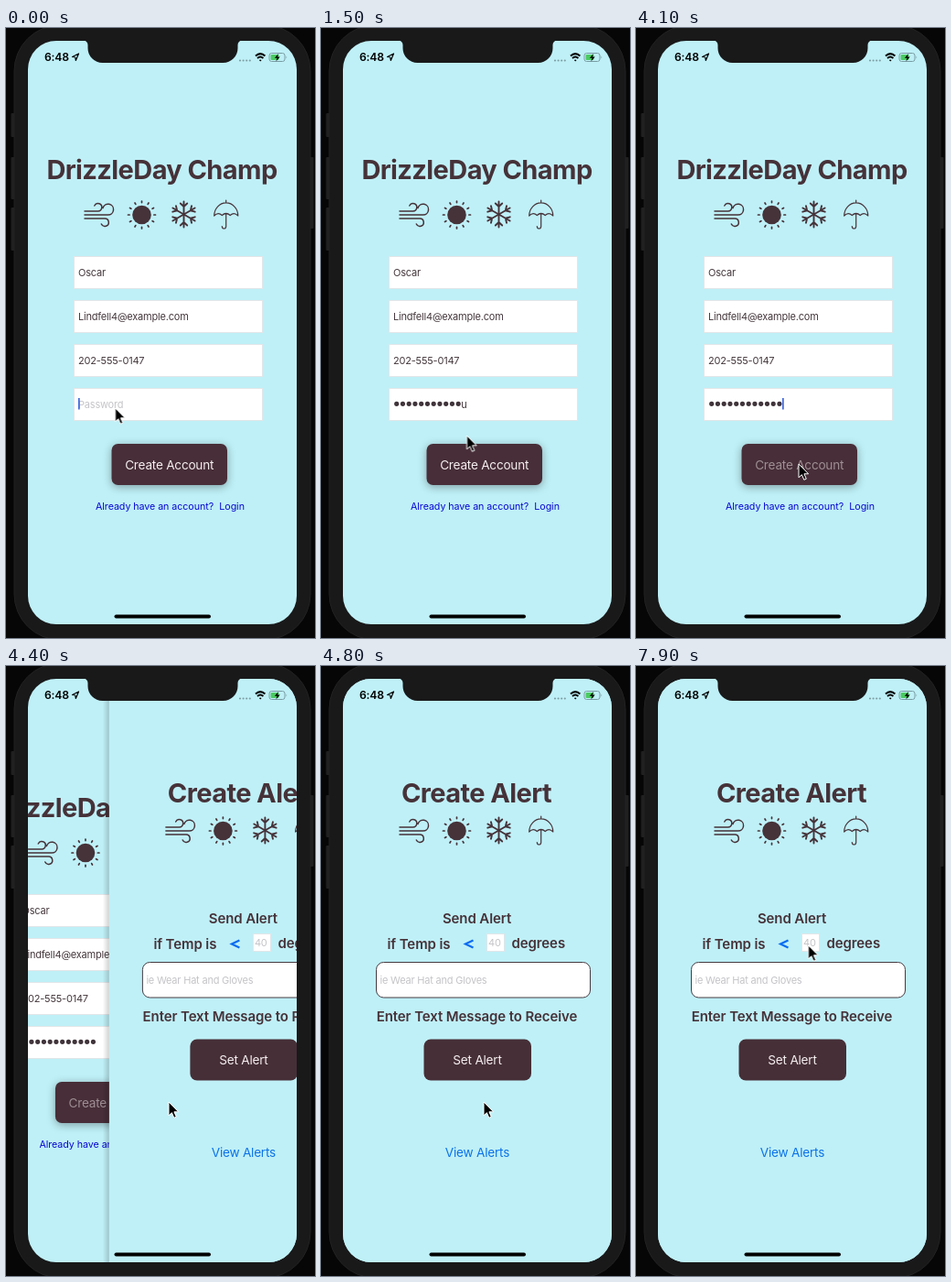
An HTML page for the animation above (8 s loop, 338x666 px).

```html
<!DOCTYPE html>
<html lang="en">
<head>
<meta charset="utf-8">
<title>Weather alert sign-up</title>
<style>
  html, body { margin: 0; width: 100%; height: 100%; overflow: hidden; background: #060607; }
  svg { display: block; width: 338px; height: 666px; font-family: Inter, Roboto, sans-serif; }
  .ink { fill: #463239; }
  .title { font-size: 29px; font-weight: 700; letter-spacing: -.6px; text-anchor: middle; }
  .label { font-size: 15px; font-weight: 600; letter-spacing: -.1px; }
  .input { font-size: 11px; letter-spacing: -.2px; fill: #45383d; }
  .hint { fill: #c4c4c8; }
  .action { font-size: 13.6px; letter-spacing: -.22px; text-anchor: middle; fill: #f5eef0; }
  .link { font-size: 10.7px; letter-spacing: -.06px; fill: #0808d4; }
  .box { fill: #fff; stroke: #e2e6e8; }
  .btn { fill: #462f37; }
  .line { fill: none; stroke: #463239; stroke-linecap: round; stroke-linejoin: round; }

  #signup { animation: leave 8s infinite; }
  #alert { animation: enter 8s infinite; }
  #press { animation: press 8s infinite; }
  #pointer { animation: point 8s infinite; }

  @keyframes enter {
    0%, 53.54% { transform: translateX(310px); }
    53.55% { transform: translateX(294px); animation-timing-function: cubic-bezier(.2833, .99, .31833, .99); }
    59.8%, 100% { transform: none; }
  }
  @keyframes leave {
    0%, 53.55% { transform: none; animation-timing-function: cubic-bezier(.2833, .99, .31833, .99); }
    59.8%, 100% { transform: translateX(-88.2px); }
  }
  @keyframes press {
    0%, 49.5% { opacity: 1; }
    51.3%, 100% { opacity: .5; }
  }
  @keyframes point {
    0%, 15.6% { transform: translate(119.5px, 415px); animation-timing-function: ease-in; }
    18.75% { transform: translate(159.5px, 445px); animation-timing-function: ease-out; }
    25.5%, 46% { transform: translate(178px, 473px); }
    51%, 63.5% { transform: translate(178px, 476px); animation-timing-function: ease-in-out; }
    71%, 87.5% { transform: translate(187px, 307px); }
    91%, 100% { transform: translate(188.5px, 305px); }
  }
</style>
</head>
<body>
<svg viewBox="0 0 338 666">
  <defs>
    <clipPath id="glass"><rect x="24" y="14" width="294" height="637" rx="31"/></clipPath>
    <filter id="soft" x="-20%" y="-50%" width="140%" height="200%">
      <feDropShadow dx="0" dy="2" stdDeviation="5" flood-opacity=".35"/>
    </filter>
    <linearGradient id="edge">
      <stop offset="0" stop-opacity="0"/>
      <stop offset="1" stop-opacity=".18"/>
    </linearGradient>

    <g id="icons">
      <path class="line" stroke-width="1.5" d="M86 200H100.5A4.2 4.2 0 1 0 96.8 194M86 204H111.5A5.9 5.9 0 1 0 106 196.5M86 208H108A4.2 4.2 0 1 1 104.3 214"/>
      <circle class="ink" cx="148.5" cy="204" r="10.3"/>
      <g id="rays" class="line" stroke-width="1.7"/>
      <g id="flake" class="line" stroke-width="1.9"/>
      <path class="line" stroke-width="1.2" d="M227.7 205A13 14 0 0 1 253.800 205Q249.500 200.500 245.200 204.500Q240.700 200.500 236.300 204.500Q232 200.500 227.700 205ZM240.700 188V191M240.700 203V216.500Q240.700 219 238.500 219Q236.300 219 236.300 216.500"/>
    </g>
  </defs>

  <!-- Phone body -->
  <g fill="#202021">
    <rect x="5.5" y="93" width="5" height="26" rx="1"/>
    <rect x="5.5" y="141" width="5" height="46" rx="1"/>
    <rect x="5.5" y="196" width="5" height="47" rx="1"/>
    <rect x="331" y="141" width="5.5" height="78" rx="1"/>
  </g>
  <rect x="9" y="-3" width="324" height="671" rx="50" fill="#19191a" stroke="#222223"/>

  <g clip-path="url(#glass)">
    <rect x="24" y="14" width="294" height="637" fill="#bff0f7"/>

    <g id="signup">
      <text class="title ink" x="170.500" y="165">DrizzleDay Champ</text>
      <use href="#icons"/>
      <g class="box">
        <rect x="74.5" y="249.5" width="206" height="35"/>
        <rect x="74.5" y="297.5" width="206" height="35"/>
        <rect x="74.5" y="345.5" width="206" height="35"/>
        <rect x="74.5" y="393.5" width="206" height="35"/>
      </g>
      <g class="input">
        <text x="79" y="271">Oscar</text>
        <text x="79" y="319">Lindfell4@example.com</text>
        <text x="79" y="366.5">202-555-0147</text>
        <text id="hint" class="hint" x="79" y="414.5">Password</text>
        <text id="letter" y="414.5"></text>
      </g>
      <path id="dots" fill="none" stroke="#40343a" stroke-width="5.2" stroke-linecap="round" stroke-dasharray="0 6.75"/>
      <rect id="caret" y="404" width="1.7" height="12.5" fill="#4169dc"/>
      <rect class="btn" x="115.5" y="454" width="126.500" height="45" rx="7" filter="url(#soft)"/>
      <text id="press" class="action" x="178.7" y="482">Create Account</text>
      <text class="link" x="98" y="525.5">Already have an account?</text>
      <text class="link" x="233.3" y="525.5">Login</text>
    </g>

    <g id="alert">
      <rect x="17" y="14" width="7" height="637" fill="url(#edge)"/>
      <rect x="24" y="14" width="294" height="637" fill="#bff0f7"/>
      <text class="title ink" x="170" y="148.5">Create Alert</text>
      <use href="#icons" y="-24"/>
      <g class="label ink">
        <text x="170.5" y="281" text-anchor="middle">Send Alert</text>
        <text x="72.5" y="309">if Temp is</text>
        <text x="208.5" y="308">degrees</text>
        <text x="170.5" y="388" text-anchor="middle">Enter Text Message to Receive</text>
      </g>
      <path d="M166.5 299.5L158 303.5L166.500 307.5" fill="none" stroke="#0a6cf0" stroke-width="2.2"/>
      <rect class="box" x="181.5" y="292.5" width="19" height="19"/>
      <text class="input hint" x="183" y="306">40</text>
      <rect x="60.5" y="323.5" width="234" height="38.5" rx="8" fill="#fff" stroke="#463b42"/>
      <text class="input hint" x="64.5" y="346.5">ie Wear Hat and Gloves</text>
      <rect class="btn" x="112.5" y="407.5" width="117.5" height="45" rx="7.5"/>
      <text class="action" x="171" y="435">Set Alert</text>
      <text class="action" x="171" y="535.5" style="fill:#0c72e8">View Alerts</text>
    </g>

    <!-- Status bar -->
    <path fill="#19191a" d="M84.5 13.5A5 5 0 0 1 89.5 18.5V22A16 16 0 0 0 105.5 38H237.5A16 16 0 0 0 253.5 22V18.5A5 5 0 0 1 258.5 13.5Z"/>
    <text x="42" y="36" font-size="12.2" font-weight="600" letter-spacing="-.2">6:48</text>
    <path d="M72.5 31.5L79.5 28L76.3 35.5L75.8 32Z" fill="none" stroke="#000" stroke-width="1.2" stroke-linejoin="round"/>
    <path d="M256 35.5H267" stroke="#7f9fa4" stroke-width="2.2" stroke-linecap="round" stroke-dasharray="0 3.6"/>
    <g fill="none" stroke="#000" stroke-width="2">
      <path d="M273 30.5Q278.2 25.7 283.4 30.5M275 33Q278.2 30 281.4 33"/>
      <path d="M278.2 36.5L276.8 35Q278.2 33.8 279.6 35Z" fill="#000" stroke="none"/>
    </g>
    <rect x="288" y="27.5" width="17" height="9" rx="2.5" fill="none" stroke="#789ca2"/>
    <path d="M306.5 30.5Q308 32 306.5 33.5Z" fill="#789ca2"/>
    <rect x="289.5" y="29" width="9" height="6" rx="1" fill="#4bcb62"/>
    <path d="M298 28L293.8 32.8H296.5L295.3 36.5L299.7 31.5H296.9Z" fill="#000"/>
    <rect x="118.5" y="640.5" width="105.5" height="4" rx="2"/>
  </g>

  <g id="pointer">
    <path d="M0 0V14.8L3.4 11.7L5.8 17.3L8.3 16.2L5.9 10.8H10.6Z" fill="#000" stroke="#fff" stroke-linejoin="round"/>
  </g>
</svg>

<script>
  const $ = id => document.getElementById(id);

  const spokes = (count, x, y, d) => Array.from({ length: count }, (_, i) =>
    `<path d="${d}" transform="translate(${x} ${y}) rotate(${i * 360 / count})"/>`).join("");
  $("rays").innerHTML = spokes(12, 148.5, 204, "M0 -13.4V-15");
  $("flake").innerHTML = spokes(6, 194.5, 203.5, "M0 0V-14M-3.7 -12L0 -8.5L3.7 -12");

  const LOOP = 8000, STEP = 6.75, PUSH = 4284;
  const word = "sunnyskies4u";
  const clamp = v => Math.max(0, Math.min(1, v));

  // Solid, fading out after 300 ms and back in from 700 ms of each second
  function blink(t) {
    const p = t % 1000;
    return p < 600 ? 1 - clamp((p - 300) / 200) : clamp((p - 700) / 200);
  }

  function draw(t) {
    const typed = t < 100 ? 0 : Math.min(word.length, 1 + Math.floor((t - 100) * 11 / 1000));
    const shown = typed && t < 2100 ? 1 : 0;
    const masked = typed - shown;
    const end = 79 + masked * STEP;

    $("hint").style.visibility = typed ? "hidden" : "visible";
    $("dots").setAttribute("d", masked ? `M82.7 410.3h${(masked - 1) * STEP + .1}` : "");
    $("letter").textContent = shown ? word[typed - 1] : "";
    $("letter").setAttribute("x", end);
    $("caret").setAttribute("x", end + (shown ? $("letter").getComputedTextLength() : 0));
    $("caret").style.opacity = t < 1100 ? 1 : t < PUSH ? blink(t) : 0;
  }

  const start = performance.now();
  function tick() {
    draw((performance.now() - start) % LOOP);
    requestAnimationFrame(tick);
  }
  tick();
</script>
</body>
</html>
```
